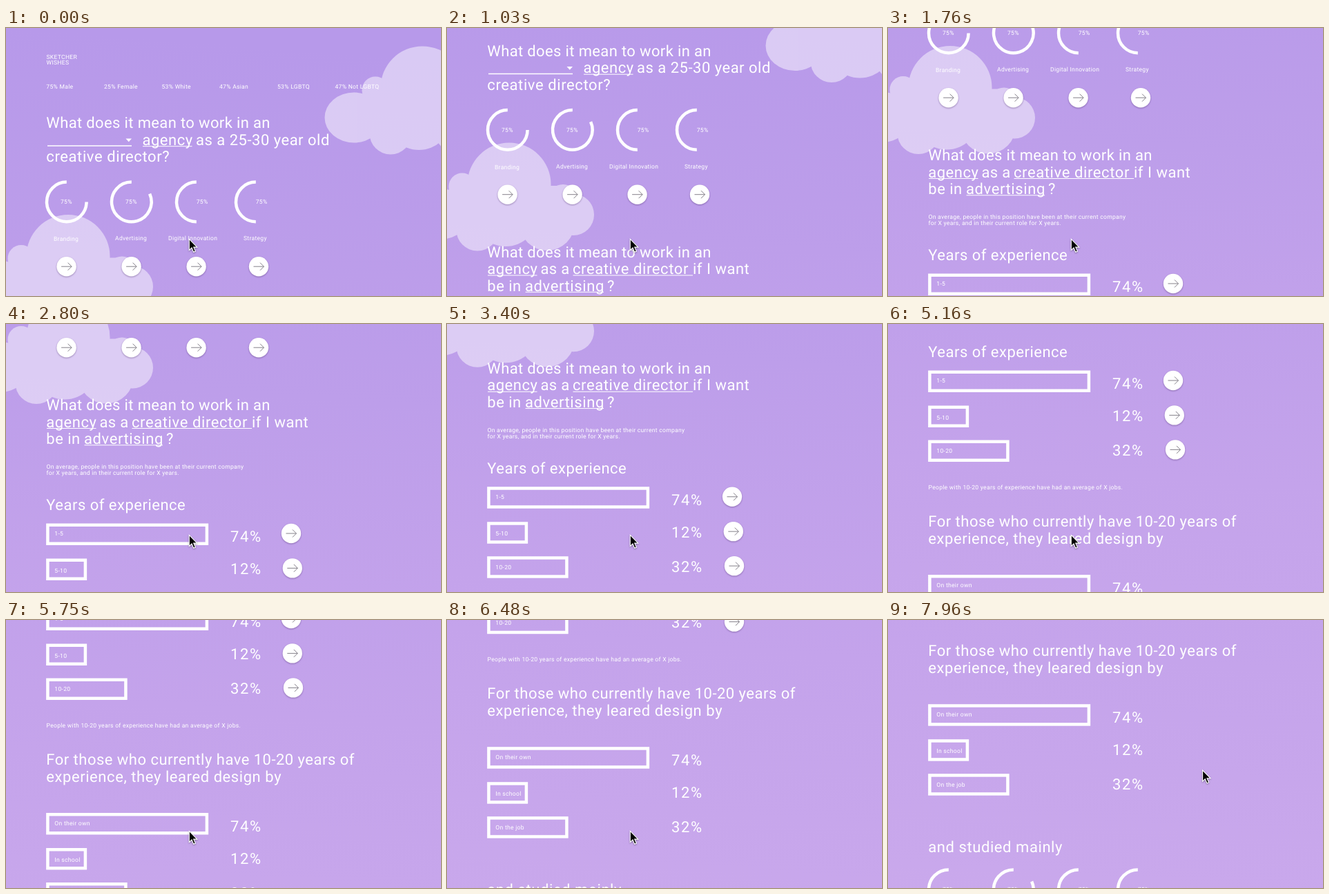
Recreate the animation shown at these times as an HTML page. Size 630 by 389 pixels, loop 8000 ms.

```html
<!DOCTYPE html>
<html lang="en">
<head>
<meta charset="utf-8">
<title>Survey page scroll</title>
<style>
  html, body { margin: 0; width: 100%; height: 100%; overflow: hidden; background: #bc9deb; }
  svg { display: block; width: 630px; height: 389px; }
  text { font-family: Roboto, "Open Sans", sans-serif; fill: #fff; white-space: pre; text-rendering: geometricPrecision; }
  .big { font-size: 22px; }
  .small { font-size: 8.6px; letter-spacing: .27px; }
  .button { filter: drop-shadow(0 1px 1px rgba(60, 30, 90, .4)); }
</style>
</head>
<body>
<svg viewBox="0 0 630 389" xmlns="http://www.w3.org/2000/svg">
  <defs>
    <linearGradient id="sky" gradientUnits="userSpaceOnUse" x1="0" y1="0" x2="-90" y2="1200">
      <stop offset="0" stop-color="#b799ea"/>
      <stop offset=".32" stop-color="#bd9eea"/>
      <stop offset=".6" stop-color="#c4a3eb"/>
      <stop offset="1" stop-color="#caa9ec"/>
    </linearGradient>
    <g id="cloud">
      <circle cx="603" cy="87" r="60.5"/>
      <circle cx="535" cy="90" r="19.5"/>
      <ellipse cx="504" cy="130" rx="42.5" ry="36.5"/>
      <circle cx="557" cy="153" r="30.5"/>
      <circle cx="598" cy="130" r="47"/>
      <circle cx="658" cy="143" r="40"/>
      <circle cx="696" cy="131" r="30"/>
      <circle cx="681" cy="108" r="21"/>
      <rect x="517" y="89" width="170" height="62"/>
    </g>
  </defs>
  <g id="page">
    <rect width="630" height="1200" fill="url(#sky)"/>
    <g fill="#fff" opacity=".48"><use href="#cloud"/></g>
    <g fill="#fff" opacity=".48"><use href="#cloud" x="-513" y="244.5"/></g>
  </g>
  <path id="cursor" d="M0 0V16.2L3.7 12.7L6.4 18.9L9 17.8L6.4 11.8H11.5Z"
        stroke="#fff" stroke-width="1.1" style="filter: drop-shadow(0 1px 1px rgba(0, 0, 0, .35))"/>
</svg>
<script>
const LOOP = 8000, START = 434, TICK = 147.4;
const page = document.getElementById('page');
const cursor = document.getElementById('cursor');

function add(tag, attrs, content) {
  const node = document.createElementNS('http://www.w3.org/2000/svg', tag);
  for (const name in attrs) node.setAttribute(name, attrs[name]);
  if (content) node.textContent = content;
  page.append(node);
}

const big = (x, y, s, gap = .5) => add('text', { x, y, class: 'big', 'letter-spacing': gap }, s);
const small = (x, y, s) => add('text', { x, y, class: 'small' }, s);
const rule = (x1, x2, y, w = 1) =>
  add('path', { d: `M${x1} ${y}H${x2}`, stroke: '#fff', 'stroke-width': w });

function button(x, y) {
  add('circle', { cx: x, cy: y, r: 14.2, fill: '#fff', class: 'button' });
  add('path', {
    d: `M${x - 7.5} ${y}h15m-5.5 -5.5l5.5 5.5l-5.5 5.5`,
    fill: 'none', stroke: '#85818a', 'stroke-width': 1
  });
}

// Ring running clockwise from the given angle round to twelve o'clock.
function ring(cx, cy, degrees) {
  const r = 28.8, a = degrees * Math.PI / 180;
  add('path', {
    d: `M${cx + r * Math.cos(a)} ${cy + r * Math.sin(a)}A${r} ${r} 0 ${degrees < 90 ? 1 : 0} 1 ${cx} ${cy - r}`,
    fill: 'none', stroke: '#fff', 'stroke-width': 4.5
  });
}

function rings(y) {
  [[87.8, 0, 79], [181.8, -24, 173], [275.8, 90, 275.7], [361.8, 90, 361.7]].forEach(([x, angle, textX]) => {
    ring(x, y, angle);
    small(textX, y + 2.8, '75%');
  });
}

function bars(y, labels) {
  const rows = [[0, 235, 17.5, 26.5], [51, 59, 71, 73.5], [101, 117.5, 119.5, 123.5]];
  rows.forEach(([top, width, labelY, valueY], i) => {
    add('rect', {
      x: 60.4, y: y + top + 2.25, width: width - 4.5, height: 27,
      fill: 'none', stroke: '#fff', 'stroke-width': 4.5
    });
    small(70.3, y + labelY, labels[i]);
    big(325, y + valueY, ['74%', '12%', '32%'][i], 1.6);
  });
}

// Header
small(58.5, 44.5, 'SKETCHER');
small(58.5, 53.3, 'WISHES');
[[58.3, '75% Male'], [142, '25% Female'], [225.5, '53% White'], [309, '47% Asian'],
 [393, '53% LGBTQ'], [476.5, '47% Not LGBTQ']].forEach(([x, s]) => small(x, 87.6, s));

// First question
big(58.3, 145, 'What does it mean to work in an', .36);
rule(60, 182, 171, 1.4);
add('path', { d: 'M173.5 160.5h8.5l-4.25 4.8z', fill: '#fff' });
big(197.5, 169.5, 'agency');
rule(198, 269.5, 171.7);
big(275, 169.5, 'as a 25-30 year old');
big(58.3, 194, 'creative director?', .6);
rings(252.4);
[[69, 309.2, 'Branding'], [158, 308, 'Advertising'], [235, 308, 'Digital Innovation'], [344, 308, 'Strategy']]
  .forEach(([x, y, s]) => small(x, y, s));
[87.6, 181.6, 275.6, 366].forEach(x => button(x, 346.2));

// Second question
big(58.3, 437.2, 'What does it mean to work in an', .36);
big(58.3, 461.7, 'agency');
rule(59, 130.5, 463.5);
big(135.5, 461.7, 'as a', .3);
big(182, 461.7, 'creative director', .6);
rule(182.5, 356, 463.5);
big(356, 461.7, 'if I want');
big(58.3, 486, 'be in');
big(113, 486, 'advertising', .6);
rule(113.5, 227, 487.8);
big(232, 486, '?');
small(58.5, 522, 'On average, people in this position have been at their current company');
small(58.5, 530.8, 'for X years, and in their current role for X years.');

// Experience
big(58.3, 582, 'Years of experience');
bars(601.5, ['1-5', '5-10', '10-20']);
button(413, 616);
button(414.8, 666.4);
button(416, 716.4);
small(58.5, 773.5, 'People with 10-20 years of experience have had an average of X jobs.');

// Learning
big(58.3, 828, 'For those who currently have 10-20 years of', .48);
big(58.3, 852.5, 'experience, they leared design by', .57);
bars(898, ['On their own', 'In school', 'On the job']);
big(58.3, 1112.8, 'and studied mainly', .57);
rings(1167);

// Keys are [tick, values...]; the screen refreshes once per tick.
const scrollKeys = [[-1, 0], [0, 8], [1, 24], [2, 48], [4, 104.5], [7, 188], [9, 245], [11, 300],
  [15, 300], [16, 312], [24, 418.5], [32, 534], [39, 681], [41, 713.8], [42, 728], [43, 736],
  [48, 736], [49, 742], [50, 758], [51, 775.8]];
const cursorKeys = [[45, 265.3, 306.3], [46, 405, 252], [47, 455.6, 218]];

function at(keys, tick, col) {
  const next = keys.findIndex(key => key[0] >= tick);
  if (next === 0) return keys[0][col];
  if (next < 0) return keys[keys.length - 1][col];
  const a = keys[next - 1], b = keys[next];
  return a[col] + (b[col] - a[col]) * (tick - a[0]) / (b[0] - a[0]);
}

function draw(time) {
  const tick = Math.max(-1, Math.floor((time % LOOP - START) / TICK));
  page.setAttribute('transform', `translate(0 ${-at(scrollKeys, tick, 1)})`);
  cursor.setAttribute('transform', `translate(${at(cursorKeys, tick, 1)} ${at(cursorKeys, tick, 2)})`);
}

const begin = performance.now();
function loop() {
  draw(performance.now() - begin);
  requestAnimationFrame(loop);
}
loop();
</script>
</body>
</html>
```
